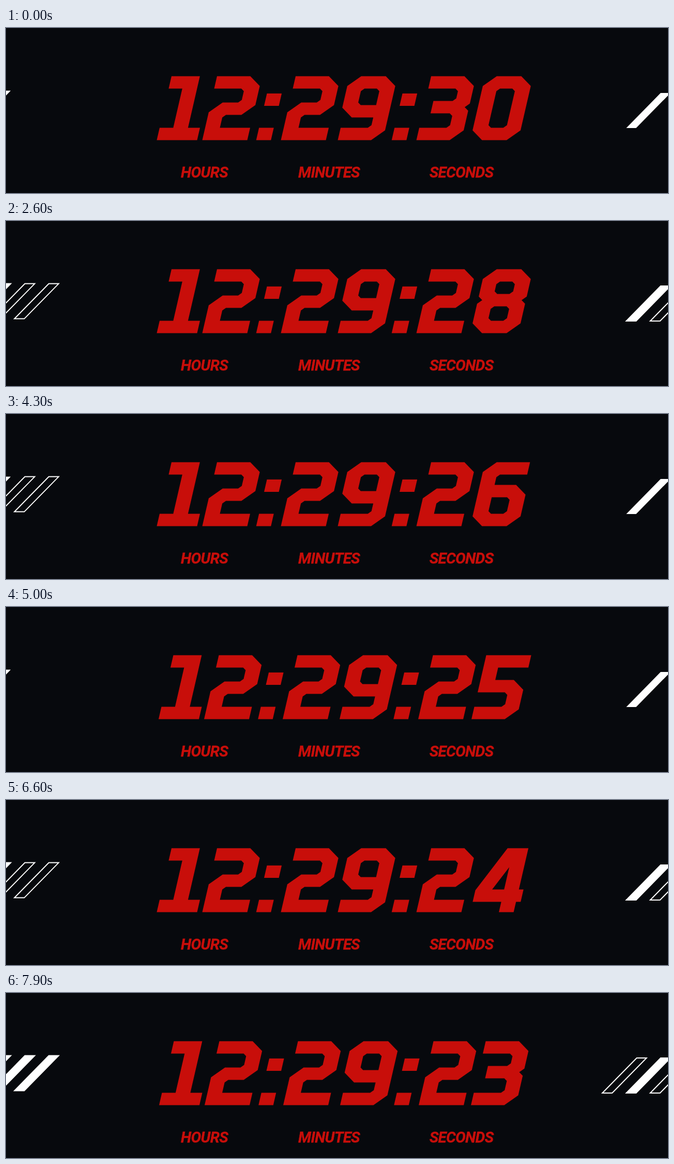
An HTML page for the animation above (8 s loop, 1280 by 320 pixels).

```html
<!DOCTYPE html>
<html lang="en">
<head>
<meta charset="utf-8">
<title>Countdown</title>
<style>
html, body { margin: 0; width: 100%; height: 100%; overflow: hidden; background: #07090d; }
svg { display: block; width: 100%; height: 100%; }
#clock { fill: none; stroke: #c80e0a; stroke-width: 24; stroke-linecap: square; stroke-miterlimit: 10; }
.labels { font: italic 700 29.5px Roboto, sans-serif; letter-spacing: -.7px; text-anchor: middle; fill: #c80e0a; stroke: #c80e0a; stroke-width: .4; }
.fill { fill: #fff; }
.line { fill: none; stroke: #fff; stroke-width: 2; }
</style>
</head>
<body>
<svg viewBox="0 0 1280 320" role="img" aria-label="Countdown in hours, minutes and seconds">
  <g id="stripes"></g>
  <g id="clock"></g>
  <g class="labels">
    <text x="383.5" y="289.5">HOURS</text>
    <text x="624.5" y="289.5">MINUTES</text>
    <text x="880.5" y="289.5">SECONDS</text>
  </g>
</svg>
<script>
const LOOP = 8000, STEP = 100, SECOND = 1000;

// Glyph skeletons: column and row of each point, capital column = cut corner, z = close
const GLYPHS = {
  0: ['Lt Rt Rb Lb z'],
  1: ['kt ct cb', 'kb db'],
  2: ['kt Rt Rm Km kb rb'],
  3: ['kt Rt Ru iu', 'iu Ru Rb kb'],
  4: ['db dt gt lq lv rv'],
  5: ['rt kt ku Ru Rb kb'],
  7: ['kt st sp cq cb'],
  8: ['Lt Rt Ru Lu z', 'Lu Ru Rb Lb z'],
  9: ['kb Rb Rt Lt Ln gn'],
  ':': ['lh lh', 'lb lb']
};
const COLS = { l: 0, k: .09, i: .33, c: .5, g: .6, d: .86, r: 1, s: 1.06 };
const ROWS = { t: 0, p: .14, h: .335, u: .48, m: .51, n: .56, q: .72, v: .8, b: 1 };
const BOX_W = 54, BOX_H = 100, CUT = 12;
const WIDEN = 1.19, SLOPE = .23;

// Spacing
const START = 300, TOP = 105.5, ADVANCE = 110;
const NARROW = { 1: 88, ':': 42 };
const KERN = { 23: 9, 25: 7, 27: 16 };

const clock = document.getElementById('clock');
const stripeLayer = document.getElementById('stripes');

function path(parent, d, attrs) {
  const el = document.createElementNS('http://www.w3.org/2000/svg', 'path');
  el.setAttribute('d', d);
  for (const key in attrs) el.setAttribute(key, attrs[key]);
  return parent.appendChild(el);
}

// Point at distance CUT from a towards b
function towards(a, b) {
  const part = CUT / Math.hypot(b.x - a.x, b.y - a.y);
  return `${a.x + (b.x - a.x) * part} ${a.y + (b.y - a.y) * part}`;
}

function strokePath(code, flip) {
  const closed = code.endsWith('z');
  const points = code.replace(' z', '').split(' ').map(([col, row]) => {
    const x = COLS[col.toLowerCase()], y = ROWS[row];
    return {
      x: BOX_W * (flip ? 1 - x : x),
      y: BOX_H * (flip ? 1 - y : y),
      cut: col < 'a'
    };
  });
  const n = points.length;
  const parts = points.map((p, i) => p.cut
    ? `${towards(p, points[(i + n - 1) % n])}L${towards(p, points[(i + 1) % n])}`
    : `${p.x} ${p.y}`);
  return 'M' + parts.join('L') + (closed ? 'Z' : '');
}

// A six is a nine turned upside down
function glyphPath(ch) {
  const flip = ch === '6';
  return GLYPHS[flip ? 9 : ch].map(code => strokePath(code, flip)).join('');
}

function drawClock(sec) {
  const kern = KERN[sec] || 0;
  let x = START + kern / 2;
  clock.replaceChildren();
  [...`12:29:${sec}`].forEach((ch, i) => {
    if (i === 7) x -= kern;
    const left = x + SLOPE * (BOX_H + 12);
    path(clock, glyphPath(ch), { transform: `matrix(${WIDEN} 0 ${-SLOPE} 1 ${left} ${TOP})` });
    x += NARROW[ch] || ADVANCE;
  });
}

// Slanted stripes, three at each edge; one per edge stays lit
const DRAW = 300, GAP = 46.3, H = 68, SLANT = 66.5, W = 19;
const EDGES = [{ x: -76.3, y: 121.6 }, { x: 1153, y: 126 }];

function bar(part) {
  const y = H * part, x = SLANT * (1 - part);
  return `M${x} ${y}H${x + W}L${SLANT + W} 0H${SLANT}Z`;
}

const stripes = EDGES.flatMap((edge, side) => [0, 1, 2].map(i => {
  const transform = `translate(${edge.x + GAP * i} ${edge.y})`;
  const lineEnd = DRAW * (1 + side + (i === 0));
  return {
    lineEnd,
    fillEnd: i === side ? 0 : lineEnd + 2 * DRAW,
    fill: path(stripeLayer, '', { class: 'fill', transform }),
    line: path(stripeLayer, bar(1), { class: 'line', transform, pathLength: 1 })
  };
}));

const progress = (phase, end) =>
  Math.max(0, Math.min(1, (phase - end + DRAW) / DRAW));

function drawStripes(phase) {
  for (const s of stripes) {
    const lined = progress(phase, s.lineEnd);
    const filled = progress(phase, s.fillEnd);
    s.line.style.display = lined ? '' : 'none';
    s.line.style.strokeDasharray = lined < 1 ? `${lined} 2` : 'none';
    s.fill.style.display = filled ? '' : 'none';
    s.fill.setAttribute('d', bar(filled));
  }
}

let shownTime = -1, shownSec = -1;
function frame() {
  const time = Math.floor(performance.now() / STEP) * STEP % LOOP;
  if (time !== shownTime) {
    shownTime = time;
    drawStripes(time % SECOND);
    const sec = 30 - Math.floor(time / SECOND);
    if (sec !== shownSec) drawClock(shownSec = sec);
  }
  requestAnimationFrame(frame);
}
frame();
</script>
</body>
</html>
```
